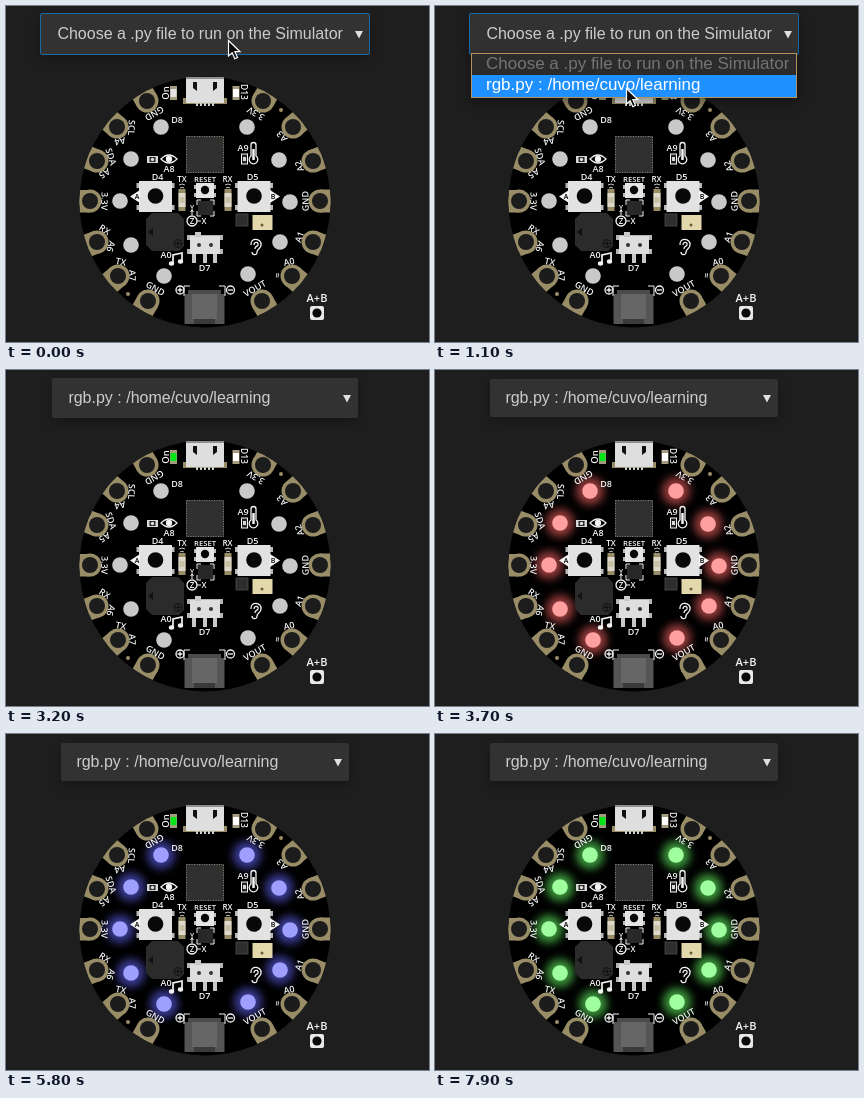
An HTML page for the animation above (8000 ms loop, 423x336 px).

```html
<!DOCTYPE html>
<html lang="en">
<head>
<meta charset="utf-8">
<title>Board simulator</title>
<style>
html, body { margin: 0; width: 100%; height: 100%; overflow: hidden; background: #1e1e1e; }
body { position: relative; font: 16px "Liberation Sans", Arial, sans-serif; color: #ccc; white-space: nowrap; }
svg, div, span { position: absolute; box-sizing: border-box; }
#board { left: 0; top: 0; font-family: "Open Sans", sans-serif; }
#board text { fill: #f4f4f4; text-anchor: middle; font-weight: 600; }

.select, .select span, .popup, .pick, .cursor, .power, .glow, .core { animation: 8s step-end infinite; }

.select {
  left: 55px; top: 9px; width: 288px; height: 38px;
  background: #323232; border: 1px solid transparent; border-radius: 2px;
  box-shadow: 0 4px 12px rgba(0, 0, 0, .28);
  animation-name: box;
}
.select span { left: 5%; top: 50%; line-height: 38px; margin-top: -19px; }
.select svg { right: 6px; top: 50%; margin-top: -3px; }
.select .ask { animation-name: ask; }
.select .chosen { animation-name: chosen; }
.popup {
  left: 36px; top: 47px; width: 326px; height: 45px;
  background: #2b2b2b; border: 1px solid #b3935a; font-size: 17px;
  box-shadow: 0 4px 12px rgba(0, 0, 0, .4);
  animation-name: popup;
}
.popup div { left: 0; width: 100%; height: 22px; padding-left: 14px; line-height: 19px; }
.popup .no { top: 0; color: #747474; }
.popup .pick { top: 21px; animation-name: pick; }
.cursor { left: 0; top: 0; overflow: visible; animation-name: cursor; }
.power { animation-name: power; }
.glow { animation-name: glow; }
.core { animation-name: core; }

@keyframes box {
  0% { left: 34px; top: 7px; width: 330px; height: 42px; border-color: #176aa5; }
  37.5% { left: 36px; top: 8px; width: 326px; height: 41px; border-color: transparent; }
  40% { left: 46px; top: 8px; width: 306px; height: 40px; border-color: transparent; }
  41.25%, 100% { left: 55px; top: 9px; width: 288px; height: 38px; border-color: transparent; }
}
@keyframes ask { 0% { opacity: 1; } 18.75%, 100% { opacity: 0; } }
@keyframes chosen { 0% { opacity: 0; } 18.75%, 100% { opacity: 1; } }
@keyframes popup { 0% { opacity: 0; } 6.25% { opacity: 1; } 18.75%, 100% { opacity: 0; } }
@keyframes pick {
  0% { background: transparent; color: #ccc; }
  11.25%, 100% { background: #1e90ff; color: #fff; }
}
@keyframes cursor {
  0% { transform: translate(222px, 34px); opacity: 1; }
  11.25% { transform: translate(236px, 72px); opacity: 1; }
  13.75% { transform: translate(191px, 82px); opacity: 1; }
  25% { transform: translate(107px, 254px); opacity: 1; }
  26.25% { transform: translate(23px, 322px); opacity: 1; }
  27.5%, 100% { transform: translate(23px, 340px); opacity: 0; }
}
@keyframes power { 0% { fill: #e2e2e2; } 40%, 100% { fill: #00e516; } }
@keyframes glow {
  0% { fill: #f66; opacity: 0; }
  46.25% { fill: #f66; opacity: .58; }
  60% { fill: #6f6; opacity: .58; }
  72.5% { fill: #66f; opacity: .58; }
  85% { fill: #f66; opacity: .58; }
  98.75%, 100% { fill: #6f6; opacity: .58; }
}
@keyframes core {
  0% { fill: #c9c9c9; }
  46.25% { fill: #ff9f9f; }
  60% { fill: #9fff9f; }
  72.5% { fill: #9f9fff; }
  85% { fill: #ff9f9f; }
  98.75%, 100% { fill: #9fff9f; }
}
</style>
</head>
<body>
<svg id="board" width="423" height="336" viewBox="0 0 423 336">
  <defs>
    <clipPath id="edge"><circle cx="199" cy="196" r="125.5"/></clipPath>
    <filter id="soft" x="-100%" y="-100%" width="300%" height="300%"><feGaussianBlur stdDeviation="4.500"/></filter>
  </defs>
  <circle cx="199" cy="196" r="125.5"/>
  <g id="pads" clip-path="url(#edge)"></g>
  <g id="pixels"></g>
  <g id="parts"></g>
  <g id="icons" fill="none" stroke="#f4f4f4" stroke-width="1.3">
    <path d="M155 153Q163 145 171 153Q163 161 155 153Z"/>
    <circle cx="163" cy="153" r="2.500" fill="#f4f4f4"/>
    <path d="M245 150V139a2.500 2.500 0 0 1 5 0V150a4.300 4.300 0 1 1-5 0Z"/>
    <path d="M247.500 143V154" stroke-width="2.500"/>
    <path d="M245 239c-1-8 11-7 10 0c0 4-4 4-4 7c0 4-5 3-5 0M248 239c0-4 5-3 4 0c-1 2-3 1-3 4"/>
    <path d="M167 257V249L176 247V255" stroke-width="1.700"/>
    <ellipse cx="165.500" cy="257.500" rx="2" ry="1.600" fill="#f4f4f4"/>
    <ellipse cx="174.500" cy="255.500" rx="2" ry="1.600" fill="#f4f4f4"/>
    <circle cx="174" cy="284" r="4"/><path d="M171.500 284h5M174 281.500v5"/>
    <circle cx="224.500" cy="284" r="4"/><path d="M222 284h5"/>
    <path d="M178 290v-10h6M219 290v-10h-6" stroke-width="1"/>
    <circle cx="186" cy="215" r="5"/>
    <path d="M186 209v-5M191 215h4M184.500 206l1.500-2 1.500 2" stroke-width="1"/>
    <path d="M191 199v-5h4M204 194h4v5M208 205v5h-4M195 210h-4v-5" stroke-width="1"/>
    <path d="M173 179q3-2 6 0M174 182q2-1.500 4 0M219 179q3-2 6 0M220 182q2-1.500 4 0" stroke-width=".8"/>
  </g>
  <g id="labels"></g>
</svg>

<div class="select">
  <span class="ask">Choose a .py file to run on the Simulator</span>
  <span class="chosen">rgb.py : /home/cuvo/learning</span>
  <svg width="8" height="8"><path d="M0 0h8L4 7.500Z" fill="#e0e0e0"/></svg>
</div>
<div class="popup">
  <div class="no">Choose a .py file to run on the Simulator</div>
  <div class="pick">rgb.py : /home/cuvo/learning</div>
</div>
<svg class="cursor" width="14" height="21">
  <path d="M.5 .5V16L4.200 12.700 6.800 18.700 9.500 17.500 6.900 11.700H12Z" fill="#0a0a0a" stroke="#fff" stroke-width="1.200"/>
</svg>

<script>
const put = (id, markup) => document.getElementById(id).insertAdjacentHTML('beforeend', markup);
const circle = (x, y, r, attrs) => `<circle cx="${x}" cy="${y}" r="${r}" ${attrs}/>`;
const rect = (x, y, w, h, fill, attrs = '') =>
  `<rect x="${x}" y="${y}" width="${w}" height="${h}" fill="${fill}" ${attrs}/>`;
const label = (text, x, y, size = 9, turn = 0) =>
  `<text transform="translate(${x} ${y}) rotate(${turn})" y="${size * .36}" font-size="${size}">${text}</text>`;
const part = (...args) => put('parts', rect(...args));
const gold = '#998d67';

// A pad open to the rim; its labels curve around the inner side
function pad(x, y, names) {
  const inward = Math.atan2(196 - y, 199 - x) * 180 / Math.PI;
  put('pads', rect(-16, -11.5, 16, 23, gold, `transform="translate(${x} ${y}) rotate(${inward})"`) +
    circle(x, y, 11.5, `fill="${gold}"`) + circle(x, y, 8, 'fill="#1c1c1c"'));
  const words = names.split(' ');
  words.forEach((word, i) => {
    const deg = inward + (i - (words.length - 1) / 2) * 76;
    const a = deg * Math.PI / 180;
    put('labels', label(word, x + 14.6 * Math.cos(a), y + 14.6 * Math.sin(a), 9, deg + 90));
  });
}
const rows = [[141, 95, 'GND', '3.3V'], [111, 121, 'SCL A4', 'A3'], [91, 155, 'SDA A5', 'A2'],
  [84, 195, '3.3V', 'GND'], [91, 236, 'RX A6', 'A1'], [112, 270, 'TX A7', '≈ A0'], [142, 295, 'GND', 'VOUT']];
for (const [x, y, left, right] of rows) {
  pad(x, y, left);
  pad(398 - x, y, right);
}
put('pads', circle(275, 104, 2, `fill="${gold}"`) + circle(122, 288, 2, `fill="${gold}"`));

const pixels = [[155, 121], [125, 153], [114, 195], [125, 239], [158, 270],
  [241, 121], [273, 154], [284, 196], [274, 236], [242, 268]];
for (const [x, y] of pixels)
  put('pixels', circle(x, y, 14, 'class="glow" filter="url(#soft)"') + circle(x, y, 7.8, 'class="core"'));

// USB socket
part(177, 92, 44, 6, gold);
part(180, 72, 38, 25, '#dedede');
part(180, 71, 38, 2, '#8f8f8f');
put('parts', '<path d="M187 76h4v9l-4-3ZM211 76h-4v9l4-3Z" fill="#111"/>');
for (let x = 190; x < 209; x += 4) part(x, 96, 2, 4, '#cfcfcf');

// Power and D13 lights
for (const x of [164, 226.5]) part(x, 80, 7, 14, '#a59c80');
part(164.5, 83, 6, 8, '#e2e2e2', 'class="power"');
part(227, 83, 6, 8, '#fff');

// Processor
part(180, 130, 38, 37, '#303030');
part(180.5, 130.5, 37, 36, 'none', 'stroke="#85806f" stroke-dasharray="1 1.5"');

// A and B buttons with side markers
for (const x of [149.5, 248]) {
  for (const y of [177, 199]) part(x - 19, y, 38, 5, '#b9b9b9');
  part(x - 16.5, 175, 33, 31, '#e2e2e2');
  put('parts', circle(x, 190, 7.8, 'fill="#080808"'));
}
put('parts', '<path d="M124 190.500L134 184V197ZM274 190.500L264 184V197Z" fill="#f4f4f4"/>');

// TX and RX lights
for (const x of [172.5, 218.5]) {
  part(x, 183, 7, 22, gold);
  part(x, 187, 7, 14, '#dcd8ca');
  part(x + 1, 191, 5, 6, '#c9c1a5');
}

// Reset button and motion sensor
part(188, 179, 22, 4, '#bbb');
part(188, 187, 22, 4, '#bbb');
part(190, 177, 18, 15, '#e4e4e4');
put('parts', circle(199, 184, 4.2, 'fill="#080808"'));
part(192, 195, 15, 14, '#282828');

// Speaker
put('parts', '<path d="M146 207H172L178 213V240L173 245H146L140 239V213Z" fill="#2b2b2b"/>' +
  '<path d="M142 226l5-4v8Z" fill="#111"/><path d="M169 237.500h6M172 234.500v6" stroke="#111"/>' +
  circle(172, 237.5, 4, 'fill="none" stroke="#111"'));

// Slide switch
for (const x of [186, 197, 207]) part(x, 245, 4, 12, '#c8c8c8');
for (const y of [229, 243]) part(181, y, 36, 5, '#b5b5b5');
part(184, 230, 30, 18, '#dedede');
part(189, 226, 6, 5, '#c8c8c8');
for (const x of [193, 205]) put('parts', circle(x, 239, 2, 'fill="#333"'));

// Sensors
part(230, 208, 12, 12, '#2d2d2d', 'stroke="#555" stroke-width=".7"');
part(246.5, 209, 20, 15, '#e3d7ac');
put('parts', circle(256, 219, 1.5, 'fill="#685d39"'));
part(141, 150, 11, 7, '#d8d8d8');
part(143.5, 151, 6, 5, '#222');
put('parts', circle(146.5, 153.5, 1.7, 'fill="#ddd"'));
part(235.5, 148, 6, 10, '#222', 'stroke="#f4f4f4"');
part(237, 151, 3, 4, '#d8d8d8');

// Battery socket
part(178.5, 288, 40, 30, '#555');
part(186, 288, 25, 25, '#666');
part(182, 284, 33, 4, '#4b4b4b');
part(188, 313, 21, 5, '#3a3a3a');

const flat = [['D8', 171, 114], ['A8', 163, 163], ['A9', 237, 142], ['D4', 151.5, 171], ['D5', 246.5, 171],
  ['TX', 176, 173, 8], ['RX', 221.5, 173, 8], ['RESET', 199, 173, 7.7], ['D7', 198.5, 262], ['A0', 160, 249],
  ['Y', 186, 201, 7], ['Z', 186, 215, 8], ['X', 198, 215, 8], ['On', 159.5, 87, 9.5, -90], ['D13', 238, 86, 8.5, 90],
  ['A+B', 311, 292, 11]];
put('labels', flat.map(args => label(...args)).join(''));
put('labels', '<g style="font-size:7px"><text x="131" y="193" style="fill:#000">A</text>' +
  '<text x="267" y="193" style="fill:#000">B</text></g>' +
  rect(304, 300, 14, 14, '#e8e8e8', 'rx="2"') + circle(311, 307, 4.6, 'fill="#080808"'));
</script>
</body>
</html>
```
